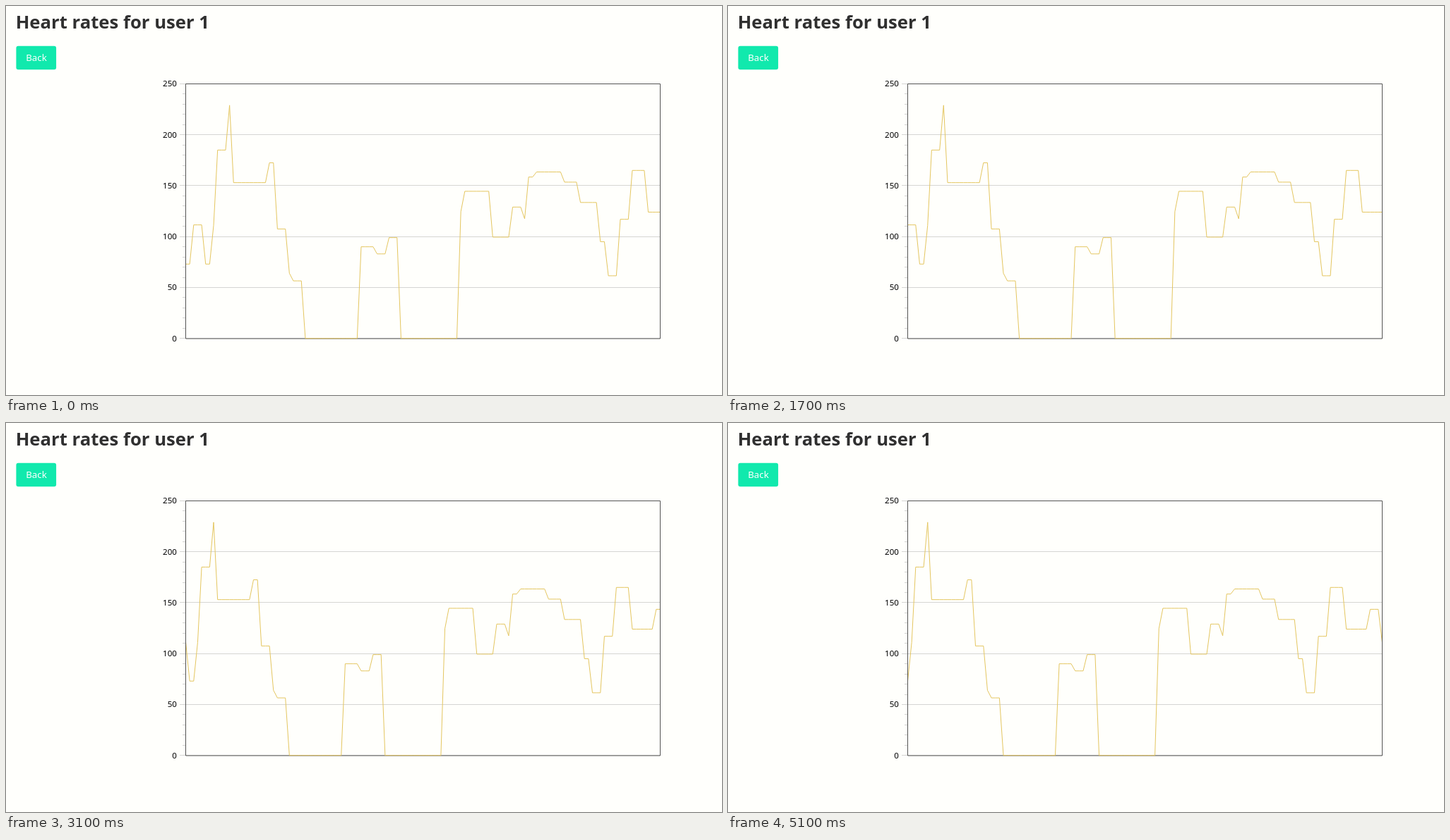
These frames come from a looping animation (1014 px wide and 552 px high, 5.5 s). An HTML page:

```html
<!DOCTYPE html>
<html lang="en">
<head>
<meta charset="utf-8">
<title>Heart rates</title>
<style>
  html, body { margin: 0; width: 100%; height: 100%; overflow: hidden; background: #fffffc; }
  svg { display: block; font-family: "Noto Sans", sans-serif; }
  .title { font-size: 25.7px; font-weight: 700; fill: #303030; }
  .back { font-size: 13.333px; fill: #fff; text-anchor: middle; }
  .label { font-size: 11.6px; font-weight: 500; text-anchor: end; }
  path, polyline { fill: none; stroke-width: 1; }
</style>
</head>
<body>
<svg width="1014" height="552">
  <text class="title" x="13.7" y="32">Heart rates for user 1</text>
  <rect x="14.4" y="56.8" width="56.7" height="33.4" rx="3" fill="#11e9ad"/>
  <text class="back" x="43" y="78.3">Back</text>
  <path id="grid" stroke="#d5d5d3"/>
  <g id="labels"></g>
  <path d="M254.5 110.5H926.5V472H254.5Z" stroke="#545454"/>
  <clipPath id="plot"><rect x="255" y="110" width="671" height="363"/></clipPath>
  <g clip-path="url(#plot)"><polyline id="line" stroke="#e4c660"/></g>
</svg>
<script>
const LEFT = 254.5, RIGHT = 926.5, TOP = 110.5, BOTTOM = 471.7, MAX = 250;
const STEP = (RIGHT - LEFT) / 119;
const LOOP = 5500, HOLD = 3;

// Readings in order; each holds for HOLD samples unless a count is given
const readings = [
  [73, 2], 111.5, [73, 2], [111, 1], 185, [229, 1], [153, 9], [172.5, 2], 107.5, [64, 1], 56.5,
  [0, 14], [90, 4], 83, 99, [0, 15],
  [124.5, 1], [144.5, 7], [99.5, 5], 129, [117.5, 1], [158.5, 2], [163.5, 7], [153.5, 4],
  [133.5, 5], [95, 2], 61.5, 117, [165, 4], [124, 6], 143.5, 111
];

const get = id => document.getElementById(id);
const toY = rate => BOTTOM - rate / MAX * (BOTTOM - TOP);
const crisp = y => Math.floor(y) + 0.5;

let grid = "", labels = "";
for (let rate = 0; rate <= MAX; rate += 10) {
  const major = rate % 50 === 0, y = toY(rate);
  grid += `M${major ? 246 : 250} ${crisp(y)}H${major ? RIGHT : LEFT}`;
  if (major) labels += `<text class="label" x="242" y="${y + 3.8}">${rate}</text>`;
}
get("grid").setAttribute("d", grid);
get("labels").innerHTML = labels;

const line = get("line");
const samples = readings.flatMap(reading => {
  const [rate, count = HOLD] = [reading].flat();
  return Array(count).fill(rate);
});
line.setAttribute("points", samples.map((rate, i) => `${LEFT + i * STEP},${toY(rate)}`).join(" "));

// The plot moves one sample at 300 ms, then once a second from 1100 ms
const shiftAt = time => (time >= 300) + Math.max(0, Math.floor((time - 100) / 1000));

function draw() {
  const shift = shiftAt(performance.now() % LOOP);
  line.setAttribute("transform", `translate(${-shift * STEP})`);
  requestAnimationFrame(draw);
}
draw();
</script>
</body>
</html>
```
